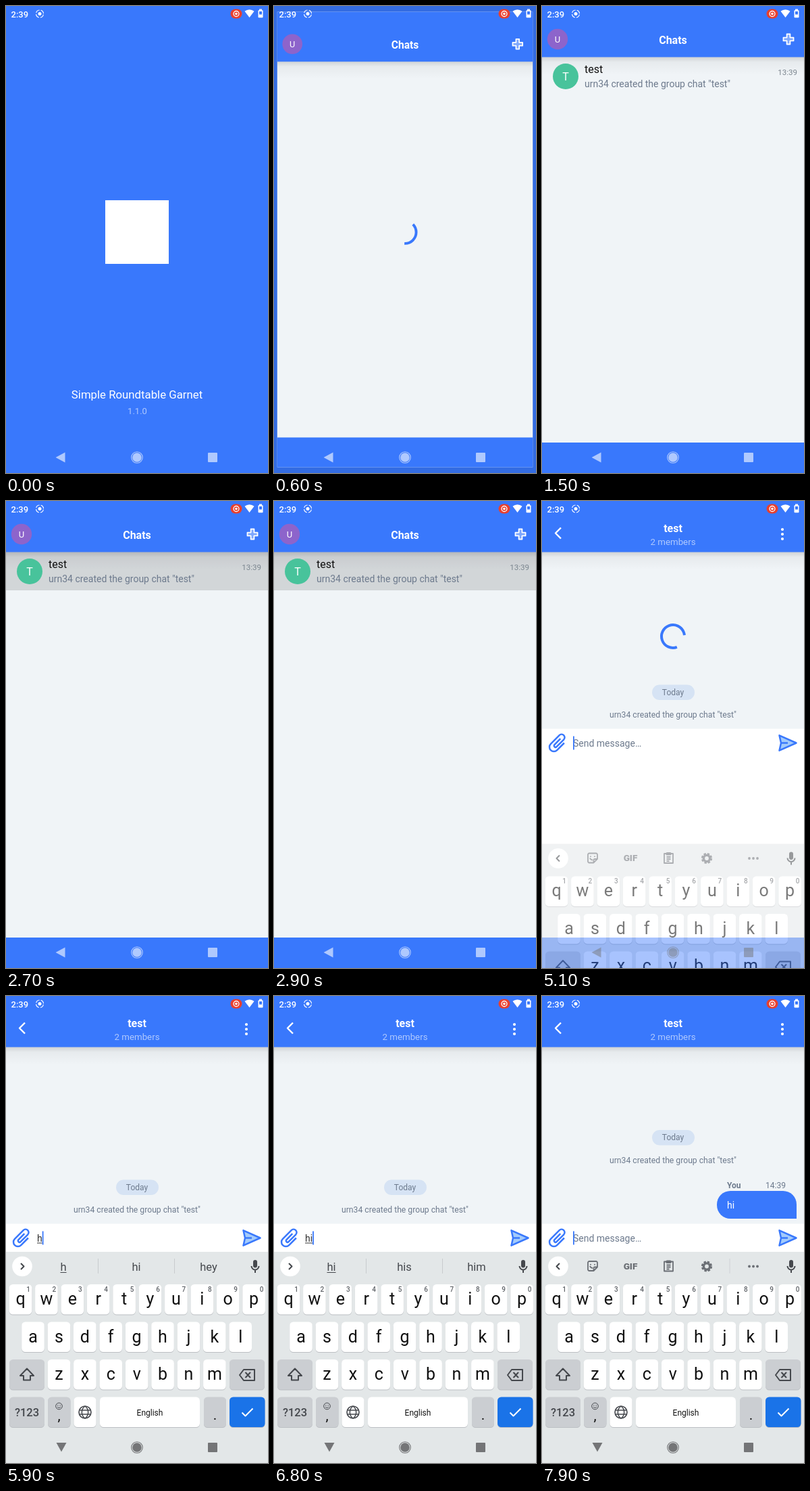
These frames come from a looping animation (388x690 px, 8 s). An HTML page with a canvas:

```html
<!DOCTYPE html>
<html lang="en">
<head>
<meta charset="utf-8">
<title>Chat walkthrough</title>
<style>
html, body { margin: 0; width: 100%; height: 100%; overflow: hidden; background: #3978fc; }
canvas { display: block; width: 100vw; height: 100vh; }
</style>
</head>
<body>
<canvas id="stage" width="388" height="690"></canvas>
<script>
const c = document.getElementById('stage').getContext('2d');
const W = 388, H = 690, LOOP = 8000;
const BLUE = '#3978fc', PAGE = '#f0f4f7', MUTED = '#6d7a8d', DARK = '#45484d', GREY = '#6b6f75';

// Timeline in ms
const T = {
  chats: 420, list: 1500, press: 2300, chat: 3150, history: 4300,
  keyboard: 5000, loaded: 5400, h: 5800, hi: 6400, sent: 7500
};

const clamp = v => Math.max(0, Math.min(1, v));
const progress = (t, from, length) => clamp((t - from) / length);
const easeOut = (p, n) => 1 - (1 - p) ** n;
const smooth = p => p * p * (3 - 2 * p);

function rect(x, y, w, h, color, r = 0) {
  c.fillStyle = color;
  c.beginPath();
  c.roundRect(x, y, w, h, r);
  c.fill();
}

function disc(x, y, r, color) {
  c.fillStyle = color;
  c.beginPath();
  c.arc(x, y, r, 0, 7);
  c.fill();
}

function ring(x, y, r, color, width, from = 0, to = 2 * Math.PI) {
  c.strokeStyle = color;
  c.lineWidth = width;
  c.beginPath();
  c.arc(x, y, r, from, to);
  c.stroke();
}

function text(s, x, y, size, color, align = 'left', weight = 400) {
  c.font = `${weight} ${size}px Roboto, sans-serif`;
  c.textAlign = align;
  c.fillStyle = color;
  c.fillText(s, x, y);
}

function icon(d, x, y, { fill, stroke, width = 2, turn = 0 }) {
  const path = new Path2D(d);
  c.save();
  c.translate(x, y);
  c.rotate(turn);
  c.lineJoin = 'round';
  if (fill) { c.fillStyle = fill; c.fill(path); }
  if (stroke) { c.strokeStyle = stroke; c.lineWidth = width; c.stroke(path); }
  c.restore();
}

function spinner(y, t, start, angle) {
  const since = t - start;
  const p = since / 1000 - Math.floor(since / 1000);
  const head = smooth(clamp(p * 2)), tail = smooth(clamp(p * 2 - 1));
  const from = angle + 0.267 * since + 90 * p + 270 * tail;
  const sweep = 14 + 270 * (head - tail);
  ring(194, y, 17, BLUE, 4, from * Math.PI / 180, (from + sweep) * Math.PI / 180);
}

function statusBar() {
  text('2:39', 7.5, 16.5, 13, '#fff', 'left', 500);
  c.setLineDash([6.4, 2.24]);
  ring(50, 11.5, 5.5, '#fff', 1.1, 0.2, 6.48);
  c.setLineDash([]);
  disc(50, 11.5, 2.5, '#fff');
  rect(332.5, 4.5, 17, 14, '#e8402f', 7);
  ring(341, 11.5, 4, '#fff', 1.3);
  disc(341, 11.5, 1.8, '#fff');
  icon('M0 6L-7-3.2A10.5 10.5 0 0 1 7-3.2Z', 360.5, 11, { fill: '#fff' });
  rect(375, 4.5, 4, 2, '#fff');
  rect(373.5, 6.2, 7, 11, '#fff', 1);
  rect(375, 8, 4, 4.5, BLUE);
}

function navButtons(color, down) {
  icon(down ? 'M-7.5-7h15L0 6.5Z' : 'M-7.5 0L6.5-7.5v15Z', down ? 82 : 81, 667, { fill: color });
  ring(194, 667, 8.3, color, 1.1);
  disc(194, 667, 6.8, color);
  rect(299, 660, 14, 14, color, 1);
}

function frame() {
  rect(0, 0, W, H, PAGE);
  const shade = c.createLinearGradient(0, 75, 0, 102);
  shade.addColorStop(0, 'rgba(0,0,0,.14)');
  shade.addColorStop(0.3, 'rgba(0,0,0,.04)');
  shade.addColorStop(1, 'rgba(0,0,0,0)');
  rect(0, 75, W, 27, shade);
  rect(0, 0, W, 75.5, BLUE);
  rect(0, 645, W, 45, BLUE);
}

function splash() {
  rect(0, 0, W, H, BLUE);
  rect(147, 287, 94, 94, '#fff');
  text('Simple Roundtable Garnet', 194, 580, 16.8, '#fff', 'center');
  text('1.1.0', 194.5, 603, 13, 'rgba(255,255,255,.6)', 'center');
}

function chatsPage(t) {
  frame();
  disc(23, 49, 15.2, '#8d64cb');
  text('U', 23, 53.7, 13, '#fff', 'center');
  text('Chats', 194, 55.5, 16, '#fff', 'center', 700);
  icon('M-2.4-7.5h4.8v5.1h5.1v4.8h-5.1v5.1h-4.8v-5.1h-5.1v-4.8h5.1Z', 365, 49,
    { fill: 'rgba(255,255,255,.35)', stroke: '#fff', width: 1.8 });
  if (t < T.list) return spinner(334, t, 365, -129);

  const p = progress(t, T.press, 300);
  if (p) {
    c.save();
    c.beginPath();
    c.rect(0, 75.5, W, 56.5);
    c.clip();
    disc(194, 104, 40 + 165 * easeOut(p, 2), `rgba(0,0,0,${0.125 * p})`);
    c.restore();
  }
  disc(35, 104, 19, '#48c39b');
  text('T', 35, 109.5, 16, '#fff', 'center');
  text('test', 63, 98.5, 16, '#111');
  text('urn34 created the group chat "test"', 63, 120, 14, MUTED);
  text('13:39', 378, 102, 11.5, '#7b858f', 'right');
}

function history(t) {
  const up = 73.5 * easeOut(progress(t, T.sent, 250), 3);
  const y = t < T.keyboard ? 266 : -up;
  c.save();
  c.beginPath();
  c.rect(0, 75.5, W, y > 0 ? 527 : 261);
  c.clip();
  c.translate(0, y);
  rect(163, 271.5, 63, 22.5, '#d6e3f4', 11.2);
  text('Today', 194, 286.8, 12, MUTED, 'center');
  text('urn34 created the group chat "test"', 194, 320, 12.2, MUTED, 'center');
  if (t >= T.sent) {
    text('You', 274, 357.5, 12, MUTED, 'left', 700);
    text('14:39', 361, 357.5, 12, MUTED, 'right');
    rect(259, 361.5, 118, 41, BLUE, [20, 20, 0, 20]);
    text('hi', 274, 387.5, 14, '#fff');
  }
  c.restore();
}

const typed = t => t < T.h || t >= T.sent ? '' : t < T.hi ? 'h' : 'hi';

function inputBar(t) {
  const open = t >= T.keyboard, y = open ? 357.5 : 624;
  rect(0, y - 21, W, open ? H - y + 21 : 42, '#fff');
  icon('M7-7v15a6.6 6.6 0 0 1-13.2 0V-10a4.6 4.6 0 0 1 9.2 0V5a2.2 2.2 0 0 1-4.4 0V-7.5', 23, y,
    { stroke: BLUE, width: 2.5, turn: Math.PI / 4 });
  icon('M-12.5-11.2L12.5 0L-12.5 11.2L-10 0ZM-10 0H0', 364, y,
    { fill: '#a3cbfb', stroke: BLUE, width: 2.5 });
  const word = typed(t);
  if (word) text(word, 46, y + 5, 14, '#333');
  else text('Send message…', 46, y + 5, 14, MUTED);
  if (!open) return;
  c.font = '400 14px Roboto, sans-serif';
  const w = c.measureText(word).width;
  if (word) rect(46, y + 7, w, 1, '#333');
  const edit = [T.sent, T.hi, T.h, T.keyboard].find(e => t >= e);
  if ((t - edit) % 1000 < 500) rect(46 + w, y - 10, 1.8, 20, BLUE);
}

function toolbar(t) {
  const line = { stroke: GREY, width: 1.8 };
  icon('M1.5 7H-5a2 2 0 0 1-2-2V-5a2 2 0 0 1 2-2H5a2 2 0 0 1 2 2V1.5L1.5 7V3a1.5 1.5 0 0 1 1.5-1.5H7', 75, 399, line);
  icon('M-4 0a4.5 4.5 0 0 0 4 3M-3-3v1.5M3-3v1.5', 75, 399, line);
  text('GIF', 131, 403.5, 13.5, GREY, 'center', 900);
  icon('M-6.5-6.5h13v14h-13ZM-3-1.5h6M-3 1.5h6M-3 4.5h4', 187.5, 399, line);
  rect(183.5, 390.5, 8, 4.5, GREY, 1.5);
  c.setLineDash([3.2, 1.9]);
  ring(244, 399.5, 6.5, GREY, 3.2);
  c.setLineDash([]);
  ring(244, 399.5, 4.6, GREY, 3.4);
  for (const x of [307, 313, 319]) disc(x, 399.5, 1.9, GREY);
  if (t >= T.sent) rect(277.5, 388, 1, 22, '#cfd2d5');
}

function suggestions(words) {
  words.forEach((word, i) => {
    const x = [85, 193, 300][i];
    text(word, x, 405.5, 16.5, DARK, 'center');
    if (!i) {
      const w = c.measureText(word).width;
      rect(x - w / 2, 408, w, 1, DARK);
    }
  });
  for (const x of [136, 249]) rect(x, 388, 1, 22, '#c8cbce');
}

function key(x, y, w, color = '#fff') {
  rect(x, y + 1, w, 44.5, '#bcbfc3', 5.5);
  rect(x, y, w, 44.5, color, 5.5);
}

function keyRow(letters, x, y, hints) {
  [...letters].forEach((letter, i) => {
    const mid = x + 38.4 * i;
    key(mid - 16.8, y, 33.6);
    text(letter, mid, y + 30, 25, '#111', 'center');
    if (hints) text((i + 1) % 10, mid + 11.5, y + 10.5, 10, '#5f6368', 'center', 500);
  });
}

function keyboard(t) {
  const word = typed(t), side = '#cbced2', line = { stroke: DARK, width: 2 };
  rect(0, 378, W, 312, '#e3e7e8');
  disc(24, 399.5, 14.8, '#fff');
  icon(word ? 'M-2-4.5L2.5 0L-2 4.5' : 'M2-4.5L-2.5 0L2 4.5', 24, 399.5, line);
  if (word) suggestions(word === 'h' ? ['h', 'hi', 'hey'] : ['hi', 'his', 'him']);
  else toolbar(t);
  rect(366, 390, 6, 11.5, DARK, 3);
  icon('M-5.5-1a5.5 5.5 0 0 0 11 0M0 5v4', 369, 400, line);

  keyRow('qwertyuiop', 21.5, 426, true);
  keyRow('asdfghjkl', 40, 481.5);
  keyRow('zxcvbnm', 78.5, 537);

  key(5, 537, 52, side);
  icon('M0-9L10 1.5H5V8H-5V1.5H-10Z', 31, 559.5, line);
  key(331, 537, 52, side);
  icon('M-11 0L-5-8H11V8H-5ZM-2.5-4L5 4M5-4L-2.5 4', 357, 560, line);

  key(5, 592.5, 52, side);
  text('?123', 31, 621, 16.5, DARK, 'center', 500);
  key(62, 592.5, 33.5, side);
  ring(78.5, 606, 4.8, DARK, 1);
  icon('M-2.5 1a3 3 0 0 0 5 0M-1.7-2v1.4M1.7-2v1.4', 78.5, 606, { stroke: DARK, width: 1 });
  text(',', 78.5, 627, 21, '#111', 'center');
  key(100.5, 592.5, 33);
  ring(117, 615, 9, DARK, 1.6);
  icon('M0-9a11 11 0 0 0 0 18a11 11 0 0 0 0-18M-8.5-3H8.5M-8.5 3H8.5', 117, 615, { stroke: DARK, width: 1.5 });
  key(139, 592.5, 148);
  text('English', 213, 619.5, 12, '#111', 'center');
  key(293, 592.5, 33, side);
  text('.', 309.5, 626, 21, '#111', 'center');
  key(331, 592.5, 52.5, '#1a73e8');
  icon('M-8 0.5L-3 5.5L8-5.5', 357.5, 615, { stroke: '#fff' });
}

function chatPage(t) {
  frame();
  icon('M4-8L-4 0L4 8', 24, 47.5, { stroke: '#fff', width: 2.4 });
  text('test', 194, 46, 16, '#fff', 'center', 700);
  text('2 members', 194, 65, 13.3, 'rgba(255,255,255,.6)', 'center');
  for (const y of [42, 49, 56]) disc(356, y, 2.1, '#fff');
  if (t < T.loaded) spinner(t < T.keyboard ? 334 : 200, t, 3600, -16);
  if (t >= T.history) history(t);
  inputBar(t);
}

// New pages fade in while growing to full size over a dimmed old page.
function enter(page, t, start) {
  const p = progress(t, start, 400);
  const scale = 0.85 + 0.15 * easeOut(p, 3);
  rect(0, 0, W, H, `rgba(0,0,0,${0.1 * clamp(p * 4)})`);
  c.save();
  c.globalAlpha = clamp(p * 4);
  c.translate(W / 2, H / 2);
  c.scale(scale, scale);
  c.translate(-W / 2, -H / 2);
  page(t);
  c.restore();
}

// The keyboard slides up and emerges from the white page and the blue bar.
function keyboardEntry(t) {
  const p = progress(t, T.keyboard, 300), shown = easeOut(p, 2);
  c.save();
  c.translate(0, 292 * (1 - shown));
  keyboard(t);
  c.restore();
  c.globalAlpha = 1 - shown;
  rect(0, 378, W, 267, '#fff');
  rect(0, 645, W, 45, BLUE);
  c.globalAlpha = p < 1 ? 0.5 : 1;
  navButtons('#747577', p > 0.5);
  c.globalAlpha = 1;
}

function draw(t) {
  if (t < T.chats + 400) splash();
  if (t >= T.chats && t < T.chat + 400) enter(chatsPage, t, T.chats);
  if (t >= T.chat) enter(chatPage, t, T.chat);
  statusBar();
  if (t < T.keyboard) navButtons('rgba(255,255,255,.6)', false);
  else keyboardEntry(t);
}

function tick() {
  draw(performance.now() % LOOP);
  requestAnimationFrame(tick);
}
tick();
</script>
</body>
</html>
```
